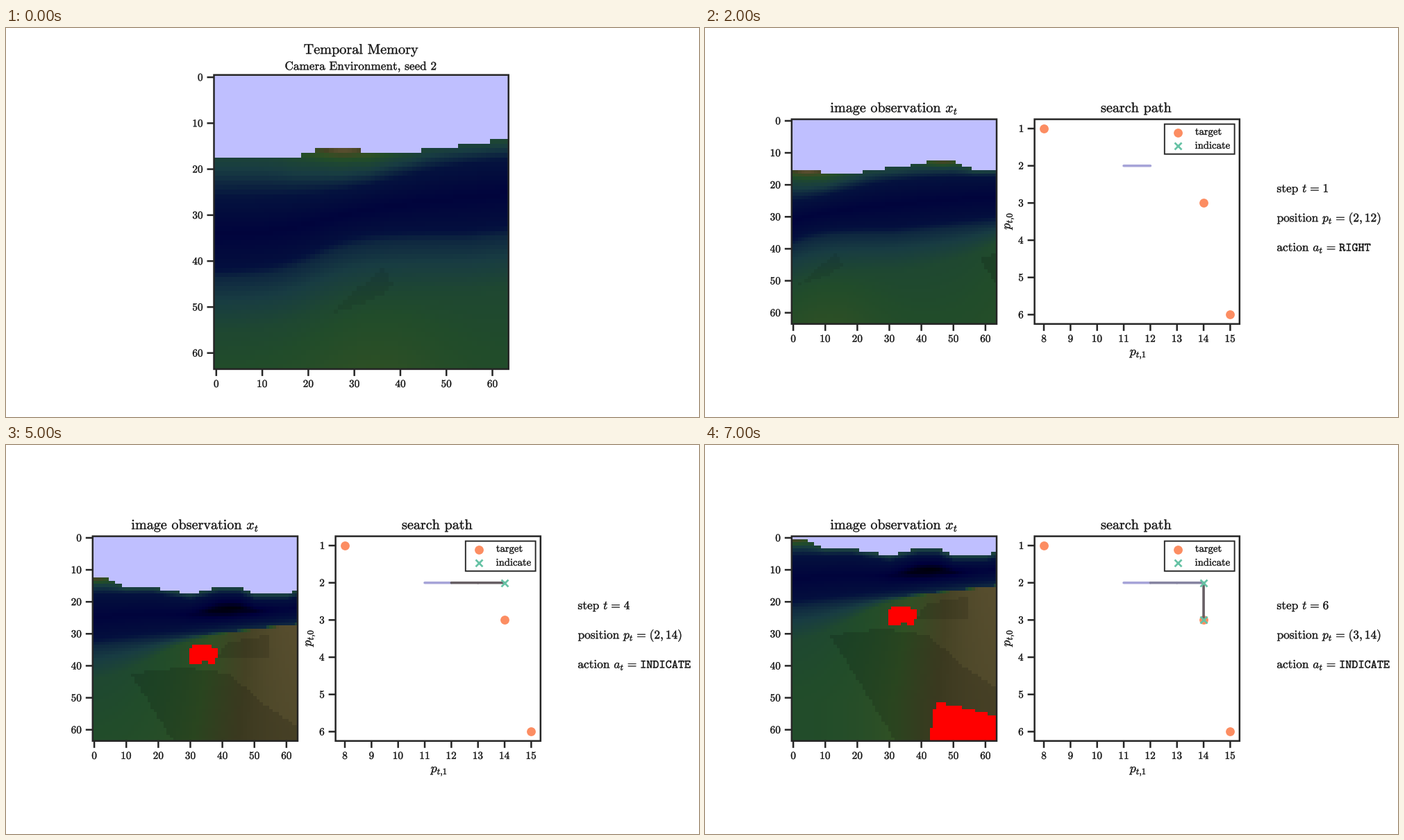
Recreate the animation shown at these times as a matplotlib script. Size 998 px wide and 561 px high, loop 8000 ms.

```python
import numpy as np
import matplotlib.pyplot as plt
from matplotlib.animation import FuncAnimation
from matplotlib.patches import PathPatch, Rectangle
from matplotlib.path import Path
from matplotlib.textpath import TextPath
from matplotlib.transforms import Affine2D

plt.rcParams["mathtext.fontset"] = "cm"

W, H, DPI = 998, 561, 64
PT = 72 / DPI  # points per pixel
INK, TEXT = "#262626", "#111111"
ORANGE, GREEN = "#fc8d62", "#66c2a5"
LIGHT, MID, DARK = "#a6a4d8", "#8684a1", "#675f64"

fig = plt.figure(figsize=(W / DPI, H / DPI), dpi=DPI, facecolor="white")
ax = fig.add_axes([0, 0, 1, 1])

# ---- terrain: one wide landscape, seen through a panning 64 x 64 window ----
SKY, RED = (191, 191, 255), (255, 0, 0)
# colour by height: black, navy, teal, green, olive, brown
RAMP = np.array([(0, 0, 4), (0, 0, 60), (4, 18, 62), (24, 60, 66),
                 (33, 76, 42), (48, 80, 36), (68, 66, 36), (98, 84, 52)])
RIDGE = [(0, 18), (17, 18), (24, 16), (31, 16), (33, 17), (43, 17), (47, 16),
         (58, 15), (68, 13), (73, 13), (80, 16), (88, 16), (100, 18),
         (109, 16), (115, 16), (120, 18), (130, 18), (134, 17)]
TARGET_SHAPES = [
    [(99.5, 36), (101.5, 34), (105.5, 34), (108.6, 35), (108.6, 37),
     (107, 40), (104, 39), (102.5, 40), (99.5, 40)],
    [(112.5, 76), (114.4, 64), (121.5, 65.3), (134, 68.2), (134, 76)],
]
# outline and brightness of flat slopes
SLOPES = [
    ([(81.5, 43), (102, 76), (140, 76), (140, 64), (123.5, 53), (112, 43), (98, 41)], 0.86),
    ([(108, 38), (112, 33), (125, 31), (125, 38)], 0.88),
    ([(25, 52), (32, 46), (37, 42), (39, 46), (34, 49)], 0.92),
]


def rise(x, centre, width):
    """Smooth step from 0 to 1."""
    return 1 / (1 + np.exp((centre - x) / width))


def bump(x, centre, width):
    return np.exp(-((x - centre) / width) ** 2)


def column(x, y, ridge):
    """Heights down one column: shore, dark valley, then the near slope."""
    valley = max(27 - 9 * rise(x, 40, 9), ridge + 2)
    end = 44.4 - 8.4 * rise(x, 22, 5) - 0.11 * max(x - 55, 0)
    green = end + 0.4 + 11 * rise(-x, -88, 7)
    floor = 1.2 - 1.2 * bump(x, 112, 10)
    slope = 3.7 + 3.1 * rise(x, 109, 8)
    bottom = 4 + 0.8 * bump(x, 35, 15) + 2.5 * rise(x, 104, 8)
    shore = 3.4 + 1.2 * bump(x, 29, 10) + 0.6 * bump(x, 70, 8)
    rows = [ridge, valley, (valley + end) / 2 - 1, end - 2.5, end, green, 64]
    return np.interp(y, rows, [shore, 2, floor, 1.8, 2.5, slope, bottom])


def terrain(dx, dy):
    x = np.arange(64) + dx + 0.5
    y = np.arange(64) + dy + 0.5
    ridge = np.interp(x, *zip(*RIDGE))
    height = np.column_stack([column(cx, y, top) for cx, top in zip(x, ridge)])
    gx, gy = np.meshgrid(x, y)
    for centre, row, width in [(28, 16.5, 7), (70.5, 13, 5)]:
        height += 2.2 * bump(gx, centre, width) * bump(gy, row, 1.4)
    cells = np.column_stack([gx.ravel(), gy.ravel()])

    def inside(outline):
        return Path(outline).contains_points(cells).reshape(64, 64)

    img = np.stack([np.interp(height, range(8), ch) for ch in RAMP.T], axis=-1)
    for outline, light in SLOPES:
        img[inside(outline)] *= light
    img[gy < np.round(ridge)] = SKY
    for outline in TARGET_SHAPES:
        img[inside(outline)] = RED
    return img.round().astype(np.uint8)


# ---- drawing helpers, all in stage pixels ----
def rm(s):
    return r"\mathrm{" + s.replace(",", "{,}").replace(" ", r"\hspace{0.38}") + "}"


def write(x, y, tex, size, align=0.5, angle=0):
    """Text with its baseline at y; align 0 = left, 0.5 = centre, 1 = right."""
    path = TextPath((0, 0), f"${tex}$", size=size)
    box = path.get_extents()
    place = (Affine2D().translate(-box.x0 - align * box.width, 0)
             .rotate_deg(angle).scale(1, -1).translate(x, y))
    ax.add_patch(PathPatch(path.transformed(place), fc=TEXT, ec=TEXT,
                           lw=0.4 * PT, zorder=6))


def line(xs, ys, color, width, cap="butt", z=3):
    ax.plot(xs, ys, color=color, lw=width * PT, solid_capstyle=cap, snap=False, zorder=z)


def frame(x0, y0, x1, y1, width):
    ax.add_patch(Rectangle((x0, y0), x1 - x0, y1 - y0, fc="none", ec=INK,
                           lw=width * PT, snap=False, zorder=5))


def axis_ticks(x0, y1, xticks, yticks):
    for value, x in xticks:
        line([x, x], [y1, y1 + 10], INK, 2.5)
        write(x, y1 + 26, rm(str(value)), 15.3)
    for value, y in yticks:
        line([x0 - 10, x0], [y, y], INK, 2.5)
        write(x0 - 16.5, y + 5, rm(str(value)), 15.3, 1)


def picture(img, x0, y0, side):
    ax.imshow(img, extent=(x0, x0 + side, y0 + side, y0), aspect="auto",
              interpolation="nearest", zorder=1)
    frame(x0, y0, x0 + side, y0 + side, 2.5)
    marks = [(v, (v + 0.5) * side / 64) for v in range(0, 61, 10)]
    axis_ticks(x0, y0 + side, [(v, x0 + d) for v, d in marks],
               [(v, y0 + d) for v, d in marks])


def dot(x, y):
    ax.plot(x, y, "o", ms=12.8 * PT, mfc=ORANGE, mew=0, snap=False, zorder=2)


def cross(x, y):
    ax.plot(x, y, "x", ms=10.4 * PT, color=GREEN, mew=2.7 * PT, snap=False, zorder=6)


# ---- the search ----
TOP, SIDE = 131.6, 295.2
LEFT_IMG, LEFT_MAP = 124.8, 474.6
START = (2, 11)
TARGETS = [(1, 8), (3, 14), (6, 15)]
ACTIONS = ["NONE", "RIGHT", "RIGHT", "RIGHT", "INDICATE", "DOWN", "INDICATE"]
MOVES = {"RIGHT": (0, 1), "DOWN": (1, 0)}


def replay(t):
    """Moves made, cells visited and cells indicated up to step t."""
    moves, track, found = [], [START], []
    for action in ACTIONS[:t + 1]:
        row, col = track[-1]
        if action in MOVES:
            dr, dc = MOVES[action]
            moves.append(action)
            track.append((row + dr, col + dc))
        elif action == "INDICATE":
            found.append((row, col))
    return moves, track, found


def view(cell):
    row, col = cell
    return terrain(23.2 * (col - START[1]), 12 * (row - START[0]))


def on_map(cell):
    row, col = cell
    margin, span = SIDE / 22, SIDE / 1.1
    return (LEFT_MAP + margin + (col - 8) / 7 * span,
            TOP + margin + (row - 1) / 5 * span)


def draw_path(moves, track):
    for k, move in enumerate(moves):
        color = LIGHT if k == 0 else DARK if move == moves[-1] else MID
        xs, ys = zip(on_map(track[k]), on_map(track[k + 1]))
        line(xs, ys, color, 3.6, "round", 4)


def legend():
    frame(661.8, 138.6, 762.6, 181.8, 1.9)
    dot(681.3, 150.6)
    cross(681.3, 169.8)
    write(706, 154, rm("target"), 14.7, 0)
    write(706, 174, rm("indicate"), 14.7, 0)


def search_map(moves, track, found):
    write(621, 121.4, rm("search path"), 20.1)
    frame(LEFT_MAP, TOP, LEFT_MAP + SIDE, TOP + SIDE, 2.5)
    axis_ticks(LEFT_MAP, TOP + SIDE,
               [(c, on_map((1, c))[0]) for c in range(8, 16)],
               [(r, on_map((r, 8))[1]) for r in range(1, 7)])
    write(622.5, 472, r"p_{t{,}1}", 18)
    write(439.5, 279.5, r"p_{t{,}0}", 18, angle=90)
    for cell in TARGETS:
        dot(*on_map(cell))
    draw_path(moves, track)
    for cell in found:
        cross(*on_map(cell))
    legend()


def intro():
    write(511.3, 37.3, rm("Temporal Memory"), 20.2)
    write(510.8, 60.4, rm("Camera Environment, seed 2"), 17.2)
    picture(view(START), 299.5, 67.7, 424.2)


def step(t):
    moves, track, found = replay(t)
    row, col = track[-1]
    write(271.7, 121.4, rm("image observation ") + "x_t", 20.1)
    picture(view(track[-1]), LEFT_IMG, TOP, SIDE)
    search_map(moves, track, found)
    eq = r"\hspace{0.12}=\hspace{0.12}"
    notes = [rm("step ") + f"t{eq}{t}",
             rm("position ") + f"p_t{eq}({row}, {col})",
             rm("action ") + f"a_t{eq}" + r"\mathtt{" + ACTIONS[t] + "}"]
    for k, note in enumerate(notes):
        write(824, 236.8 + 42.4 * k, note, 17.35, 0)


def update(i):
    ax.clear()
    if i == 0:
        intro()
    else:
        step(i - 1)
    ax.set_xlim(0, W)
    ax.set_ylim(H, 0)
    ax.axis("off")
    return []


anim = FuncAnimation(fig, update, frames=8, interval=1000, init_func=lambda: [],
                     repeat=True, repeat_delay=0, blit=False)
plt.show()
```
